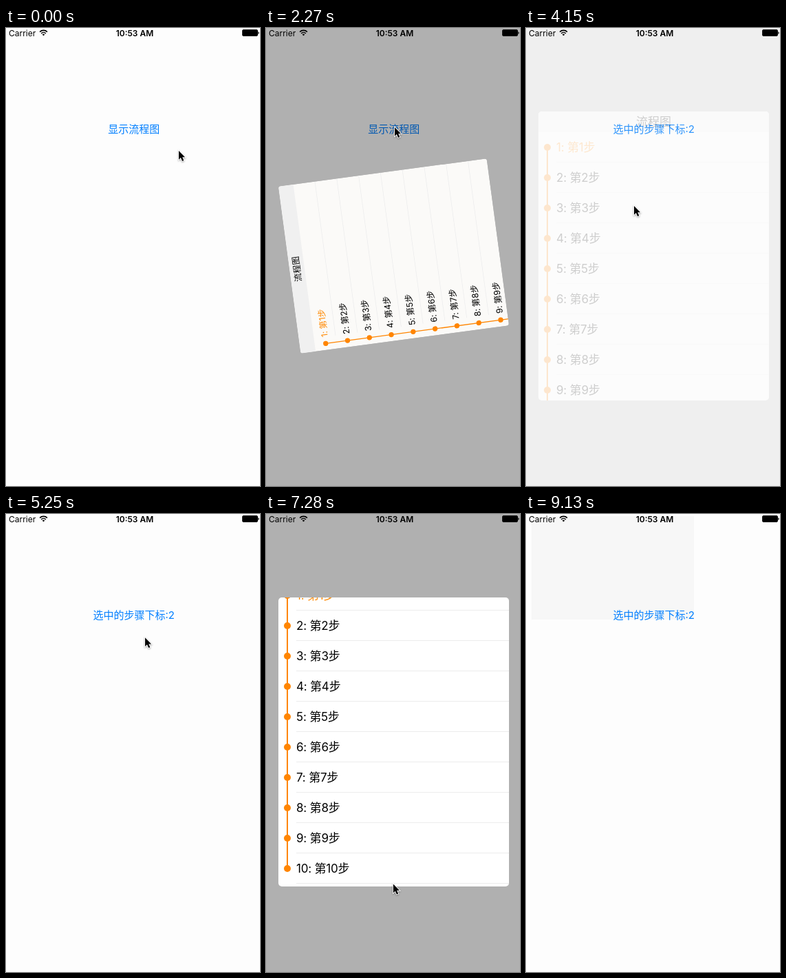
These frames come from a looping animation (369x664 px, 9.54 s). An HTML page:

```html
<!DOCTYPE html>
<html lang="zh">
<head>
<meta charset="utf-8">
<style>
  html, body { margin: 0; width: 100%; height: 100%; overflow: hidden; background: #fdfdfd; }
  svg { display: block; width: 369px; height: 664px; }
  text { font: 17px Inter, "Noto Sans CJK SC", "Noto Sans CJK", sans-serif; white-space: pre; }
  .mid { text-anchor: middle; }
  #label { font-size: 15px; fill: #007fff; }
  .status text { font-size: 12px; }
  .status .clock { font-weight: 600; }
  #rows text { letter-spacing: -.2px; }
  #cursor { filter: drop-shadow(0 1px 1px #0005); }
</style>
</head>
<body>
<svg viewBox="0 0 369 664">
  <clipPath id="card"><rect x="18" y="121" width="335" height="419" rx="5"/></clipPath>
  <rect width="369" height="664" fill="#fdfdfd"/>
  <rect id="shade" x="8" y="3" width="236" height="150" fill="#f7f7f7"/>
  <text id="label" class="mid" x="185.7" y="151.5"></text>

  <g id="overlay">
    <rect width="369" height="664" fill="#000" opacity=".305"/>
    <g id="popup">
      <g clip-path="url(#card)">
        <rect id="body" x="18" y="121" width="335" height="419"/>
        <g id="list">
          <rect x="18" y="121" width="335" height="30" fill="#f0f0f0"/>
          <text class="mid" x="185.5" y="142">流程图</text>
          <rect x="30" y="173" width="2" height="396" fill="#ff8500"/>
          <g id="rows"></g>
        </g>
      </g>
    </g>
  </g>

  <g class="status">
    <text x="4" y="11.5">Carrier</text>
    <path d="M54.5 11.2l-1.8-1.8a2.6 2.6 0 0 1 3.6 0z"/>
    <path d="M51.2 7.9a4.7 4.7 0 0 1 6.6 0M49.1 5.6a7.7 7.7 0 0 1 10.8 0" fill="none" stroke="#000" stroke-width="1.6"/>
    <text class="mid clock" x="187" y="11.5">10:53 AM</text>
    <rect x="343.5" y="2.5" width="22" height="9" rx="1.5" stroke="#000" stroke-opacity=".8"/>
    <path d="M366.3 5.2a2 2 0 0 1 0 3.8z"/>
  </g>

  <g id="cursor">
    <path d="M0 0V14.5L3.3 11.5L5.8 17L8.3 16L5.9 10.6H10.3Z" transform="scale(.88)" stroke="#fff" stroke-width="2" paint-order="stroke"/>
  </g>
</svg>
<script>
const LOOP = 9540, SHOW_TIME = 336;
const $ = id => document.getElementById(id);
const smooth = (t, from, to) => {
  const x = Math.min(1, Math.max(0, (t - from) / (to - from)));
  return x * x * (3 - 2 * x);
};

const popups = [
  { open: 2050, fade: 3860, gone: 4260, body: '#fbfaf8' },
  { open: 5780, fade: 7850, gone: 8110, body: '#fff' }
];

// eased pointer strokes; bowX and bowY bend them into arcs
const strokes = [
  { from: 60, to: 120, x: 244, y: 108 },
  { from: 350, to: 1450, x: 187, y: 144, bowX: 37, bowY: 50 },
  { from: 2930, to: 3560, x: 157, y: 258, bowY: 68 },
  { from: 4800, to: 5500, x: 196, y: 147, bowX: 22 },
  { from: 5780, to: 6060, x: 194, y: 255 },
  { from: 6940, to: 7384, x: 168, y: 581, bowX: 32 },
  { from: 8590, to: 9130, x: 315, y: 664 }
];

function pointer(t) {
  let px = 251, py = 178;
  for (const { from, to, x, y, bowX = 0, bowY = 0 } of strokes) {
    const p = smooth(t, from, to), arc = Math.sin(Math.PI * p);
    px += (x - px) * p + bowX * arc;
    py += (y - py) * p + bowY * arc;
  }
  return [px, py];
}

// drag past the end, then spring back to the last row
function scroll(t) {
  return t < 6940 ? 75 * smooth(t, 6530, 6760) : 51 + 24 * Math.exp((6940 - t) / 190);
}

$('rows').innerHTML = Array.from({ length: 10 }, (_, i) => {
  const y = 173 + 44 * i, n = i + 1;
  return `<circle cx="31" cy="${y}" r="5" fill="#ff8500"/>
    <text x="44" y="${y + 6}" fill="${i ? '#000' : '#ff8c0a'}">${n}: 第${n}步</text>
    <rect x="44" y="${y + 21}" width="309" height="1" fill="#ececec"/>`;
}).join('');

function show(id, on) {
  $(id).style.display = on ? '' : 'none';
}

function draw(t) {
  $('label').textContent = t < popups[0].fade ? '显示流程图' : '选中的步骤下标:2';
  show('shade', t >= popups[1].gone);

  const popup = popups.find(p => t >= p.open && t < p.gone);
  show('overlay', popup);
  if (popup) {
    const { open, fade, gone, body } = popup;
    const p = smooth(t, open, open + SHOW_TIME);
    $('overlay').setAttribute('opacity', 1 - smooth(t, fade, gone));
    $('popup').setAttribute('transform',
      `translate(185.5 330.5) rotate(${360 * p}) scale(${p}) translate(-185.5 -330.5)`);
    $('body').setAttribute('fill', body);
    $('list').setAttribute('transform', `translate(0 ${-scroll(t)})`);
  }

  show('cursor', t < 9130);
  $('cursor').setAttribute('transform', `translate(${pointer(t)})`);
}

const begin = performance.now();
function tick() {
  draw((performance.now() - begin) % LOOP);
  requestAnimationFrame(tick);
}
tick();
</script>
</body>
</html>
```
